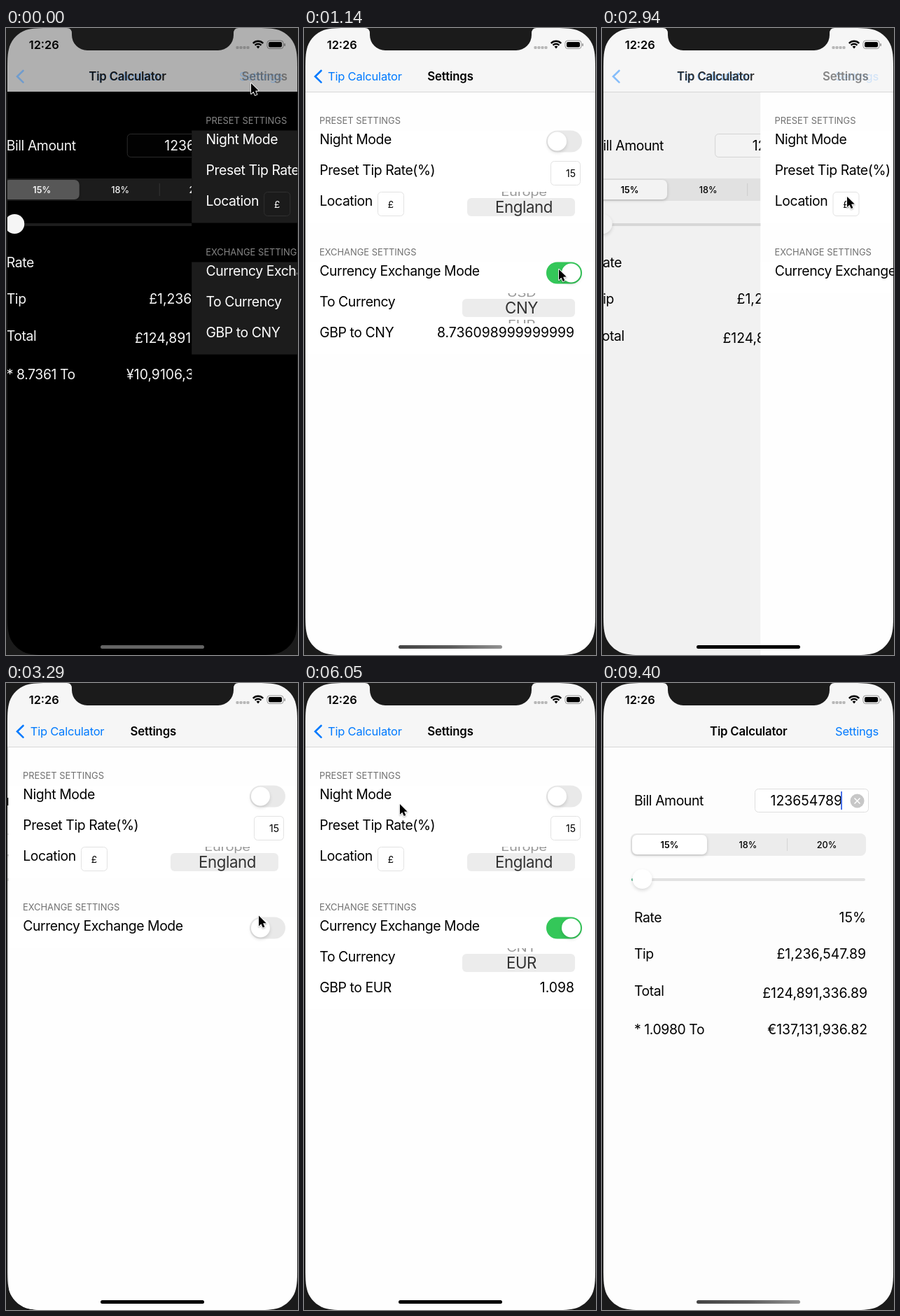
An HTML page with a canvas that plays this animation: 417 by 896 pixels, repeating every 9500 ms.

```html
<!DOCTYPE html>
<html lang="en">
<head>
<meta charset="utf-8">
<title>Tip Calculator</title>
<style>
html, body { margin: 0; width: 100%; height: 100%; overflow: hidden; background: #1b1b1b; }
canvas { display: block; }
</style>
</head>
<body>
<canvas id="stage" width="417" height="896"></canvas>
<script>
const ctx = document.getElementById('stage').getContext('2d');
const LOOP = 9500, WIDTH = 414, BLUE = '#007aff', BEZEL = '#1b1b1b';
const NIGHT_OFF = 640, EXCHANGE_OFF = 1320, EXCHANGE_ON = 4290, CURRENCY_SET = 5450;
const slides = [
  { start: -74, push: true }, { start: 2103, push: false },
  { start: 2850, push: true }, { start: 6475, push: false }
];
// Pointer path: time, x, y
const pointer = [
  [0, 350, 79], [90, 350, 80], [500, 371, 167], [640, 371, 167], [960, 364, 339],
  [1030, 364, 339], [1140, 364, 345], [1480, 364, 345], [2020, 49, 74], [2270, 49, 74],
  [2680, 345, 73], [2840, 347, 80], [2940, 350, 241], [3200, 361, 332], [3590, 361, 336],
  [3880, 360, 330], [4110, 362, 350], [4290, 362, 350], [4410, 353, 387], [4820, 330, 418],
  [5000, 330, 418], [5300, 328, 388], [5450, 328, 388], [5760, 165, 204], [5940, 165, 204],
  [6290, 47, 74], [6500, 47, 74], [6890, 107, 75], [7400, 390, 67], [7770, 390, 67], [8660, 376, 900]
];

const clamp = v => Math.max(0, Math.min(1, v));
const ramp = (t, start, length) => clamp((t - start) / length);
const smooth = v => v * v * (3 - 2 * v);
const spring = s => s <= 0 ? 0 : 1 - (1 + 17 * s) * Math.exp(-17 * s);

let light = 0;
const gray = v => `rgb(${v},${v},${v})`;
const tone = (dark, bright) => gray(Math.round(dark + (bright - dark) * light));

function text(s, x, y, { size = 19.4, color = tone(255, 0), weight = 400, align = 'left', spacing = -0.42, alpha = 1 } = {}) {
  ctx.save();
  ctx.globalAlpha *= clamp(alpha);
  ctx.font = `${weight} ${size}px Inter, sans-serif`;
  ctx.letterSpacing = spacing + 'px';
  ctx.textAlign = align;
  ctx.fillStyle = color;
  ctx.fillText(s, x, y);
  ctx.restore();
}

const figure = (s, right, y, size) => text(s, right, y, { size, align: 'right', spacing: 0 });

function box(x, y, w, h, r, fill, stroke) {
  ctx.beginPath();
  ctx.roundRect(x, y, w, h, r);
  if (fill) { ctx.fillStyle = fill; ctx.fill(); }
  if (stroke) { ctx.strokeStyle = stroke; ctx.lineWidth = 1; ctx.stroke(); }
}

function shadowed(blur, dy, alpha, draw) {
  ctx.save();
  ctx.shadowColor = `rgba(0,0,0,${alpha})`;
  ctx.shadowBlur = blur;
  ctx.shadowOffsetY = dy;
  draw();
  ctx.restore();
}

function clipped(x, y, w, h, draw) {
  ctx.save();
  ctx.beginPath();
  ctx.rect(x, y, w, h);
  ctx.clip();
  draw();
  ctx.restore();
}

function line(points, color, width) {
  ctx.beginPath();
  points.forEach(([x, y]) => ctx.lineTo(x, y));
  ctx.strokeStyle = color;
  ctx.lineWidth = width;
  ctx.stroke();
}

function knob(x, y, r) {
  shadowed(5, 2.5, 0.14, () => box(x - r, y - r, 2 * r, 2 * r, r, '#fff'));
}

function toggle(y, position, tint) {
  box(346, y, 51, 31, 15.5, tone(57, 233));
  ctx.save();
  ctx.globalAlpha *= tint;
  box(346, y, 51, 31, 15.5, light > 0.5 ? '#34c759' : '#30d158');
  ctx.restore();
  knob(361.5 + 20 * position, y + 15.5, 13.5);
}

function wheel(x, y, w, top, height, items, selected) {
  const mid = x + w / 2, center = y + 13;
  box(x, y, w, 26, 6, tone(47, 236));
  clipped(x, top, w, height, () => items.forEach((item, i) => {
    const away = i - selected, distance = Math.min(1, Math.abs(away));
    if (Math.abs(away) > 1.5) return;
    ctx.save();
    ctx.translate(mid, center + 22.5 * away);
    ctx.scale(1, 1 - 0.2 * distance);
    text(item, 4, 8.2, { size: 22.3 - 2 * distance, align: 'center', color: tone(190, 50), alpha: 1 - 0.5 * distance });
    ctx.restore();
  }));
}

function drawMain(t, exchange, focused) {
  ctx.fillStyle = tone(0, 253);
  ctx.fillRect(2, 91, WIDTH, 805);
  text('Bill Amount', 46, 175);
  box(218.5, 151.5, 162, 33, 5, tone(2, 255), tone(44, 222));
  figure('123654789', focused ? 343 : 374, 175);
  if (focused) {
    const phase = t < 7450 ? 700 : (t - 7450) % 790;
    ctx.globalAlpha = phase < 300 ? 1 - ramp(phase, 0, 60) : ramp(phase, 300, 60);
    ctx.fillStyle = '#4a72e8';
    ctx.fillRect(341, 155, 2, 26);
    ctx.globalAlpha = 1;
    box(354.5, 158.5, 20, 20, 10, tone(100, 199));
    line([[360.5, 164.5], [368.5, 172.5]], '#fff', 1.5);
    line([[368.5, 164.5], [360.5, 172.5]], '#fff', 1.5);
  }

  box(41, 215, 336, 32, 8, tone(29, 236));
  shadowed(4, 1.5, 0.2, () => box(43, 217, 107, 28, 7, tone(91, 255)));
  line([[264.5, 222], [264.5, 240]], tone(55, 213), 1);
  [['15%', 96.5, 600], ['18%', 208.5, 500], ['20%', 321, 500]].forEach(([label, x, weight]) =>
    text(label, x, 235.5, { size: 12.7, weight, align: 'center', spacing: 0 }));

  box(42, 279, 334, 4, 2, tone(30, 226));
  box(42, 279, 10, 4, 2, '#34a878');
  knob(57.5, 280, 14);

  const row = (label, value, y, right = 377, drop = 0) => {
    text(label, 46, y);
    figure(value, right, y + drop);
  };
  row('Rate', '15%', 342);
  row('Tip', '£1,236,547.89', 394);
  row('Total', '£124,891,336.89', 447, 379, 3);
  if (exchange) {
    if (t < CURRENCY_SET) row('* 8.7361 To', '¥10,9106,3083.34', 502, 379);
    else row('* 1.0980 To', '€137,131,936.82', 502, 379);
  }
}

function drawSettings(t, exchange) {
  ctx.fillStyle = tone(0, 254);
  ctx.fillRect(2, 91, WIDTH, 805);
  const header = { size: 12.9, color: tone(134, 112), spacing: 0 };
  const shown = t < EXCHANGE_ON ? 1 - ramp(t, EXCHANGE_OFF, 250) : ramp(t, EXCHANGE_ON, 100);

  text('PRESET SETTINGS', 22, 136.5, header);
  text('EXCHANGE SETTINGS', 22, 324.5, header);
  ctx.fillStyle = tone(28, 255);
  ctx.fillRect(2, 146.5, WIDTH, 132);
  ctx.fillRect(2, 334.5, WIDTH, 44 + 88 * shown);

  text('Night Mode', 22.3, 166);
  toggle(146.5, 1 - smooth(ramp(t, NIGHT_OFF, 130)), 1 - ramp(t, NIGHT_OFF, 250));
  text('Preset Tip Rate(%)', 22.3, 210);
  box(352.5, 190.5, 42, 34, 5, tone(27, 255), tone(48, 226));
  figure('15', 388, 213, 14);
  text('Location', 22.3, 254);
  box(105.5, 234.5, 37, 34, 5, tone(27, 255), tone(48, 226));
  text('£', 124, 257, { size: 13.6, align: 'center', spacing: 0 });
  wheel(233, 243, 154, 234, 44, ['Europe', 'England'], 1);

  text('Currency Exchange Mode', 22.3, 354);
  toggle(334.5,
    exchange === (t >= EXCHANGE_ON) ? smooth(ramp(t, EXCHANGE_ON, 130)) : 1 - smooth(ramp(t, EXCHANGE_OFF, 130)),
    t >= EXCHANGE_ON ? ramp(t, EXCHANGE_ON, 240) : 1 - ramp(t, EXCHANGE_OFF, 240));

  if (shown > 0) {
    ctx.save();
    ctx.globalAlpha = shown;
    text('To Currency', 22.3, 398);
    wheel(226, 387, 161, 379, 43, ['USD', 'CNY', 'EUR'], 1 + smooth(ramp(t, 5000, 450)));
    const euro = t >= CURRENCY_SET;
    text(euro ? 'GBP to EUR' : 'GBP to CNY', 22.3, 442);
    figure(euro ? '1.098' : '8.736098999999999', 386, 442);
    ctx.restore();
  }
}

function drawNavigation(p, push) {
  ctx.fillStyle = tone(176, 246);
  ctx.fillRect(2, 0, WIDTH, 91);
  ctx.fillStyle = tone(0, 214);
  ctx.fillRect(2, 91, WIDTH, 1);

  const moved = Math.pow(p, push ? 1.2 : 0.75);
  const left = 154 - 120 * moved;
  const backAlpha = push ? p : 0.3 * p;
  const bold = { size: 16.8, weight: 600, color: '#000', spacing: -0.2 };
  const link = { size: 16.5, color: BLUE, spacing: -0.2 };

  text('Tip Calculator', left, 75, { ...link, alpha: backAlpha });
  text('Tip Calculator', left, 75, { ...bold, alpha: push ? 1 - p * p : 1 - p });
  text('Settings', 333, 75, { ...link, alpha: push ? (1 - p) ** 3 : 1 - p });
  text('Settings', 209 + 228 * (1 - moved), 75, { ...bold, align: 'center', alpha: p });
  ctx.globalAlpha = backAlpha;
  ctx.lineCap = 'round';
  line([[24.5, 61], [16, 69.3], [24.5, 77.6]], BLUE, 2.6);
  ctx.lineCap = 'butt';
  ctx.globalAlpha = 1;
}

function drawStatusBar() {
  text('12:26', 32.7, 29.5, { size: 16.4, weight: 600, color: '#000', spacing: 0 });
  for (let i = 0; i < 4; i++) box(328.5 + 5 * i, 26, 4, 4, 1.2, tone(138, 184));
  ctx.fillStyle = ctx.strokeStyle = '#000';
  ctx.lineWidth = 2.4;
  [6.3, 10.2].forEach(r => {
    ctx.beginPath();
    ctx.arc(360, 29, r, -Math.PI * 0.75, -Math.PI * 0.25);
    ctx.stroke();
  });
  ctx.beginPath();
  ctx.moveTo(360, 29.5);
  ctx.arc(360, 29, 3.4, -Math.PI * 0.75, -Math.PI * 0.25);
  ctx.fill();
  box(373, 18, 23, 11.5, 3.5, null, 'rgba(0,0,0,.4)');
  box(375, 20, 19, 7.5, 2, '#000');
  box(397.3, 22, 1.5, 4, 1, 'rgba(0,0,0,.45)');
}

function drawHomeBar(t) {
  let fill = tone(100, 0);
  if (t > 6500 || (t > NIGHT_OFF && t < 2400)) {
    fill = ctx.createLinearGradient(135, 0, 283, 0);
    fill.addColorStop(0, '#444');
    fill.addColorStop(0.5, '#5c5c5c');
    fill.addColorStop(1, '#929292');
  }
  box(135, 882, 148, 5, 2.5, fill);
}

// Smooth-cornered display outline, one quarter per rotation of the corner curve
function screenPath() {
  const r = 41.5, w = WIDTH / 2, h = 448;
  ctx.beginPath();
  [[-1, -1], [1, -1], [1, 1], [-1, 1]].forEach(([sx, sy]) => {
    const curve = [[0, 1.529], [0, 1.088], [0, 0.868], [0.075, 0.631], [0.169, 0.373],
      [0.373, 0.169], [0.631, 0.075], [0.868, 0], [1.088, 0], [1.529, 0]]
      .map(([x, y]) => [2 + w + sx * (w - r * x), h + sy * (h - r * y)]);
    if (sx !== sy) curve.reverse();
    ctx.lineTo(...curve[0]);
    for (let i = 1; i < 10; i += 3) ctx.bezierCurveTo(...curve[i], ...curve[i + 1], ...curve[i + 2]);
  });
  ctx.closePath();
}

function drawNotch() {
  ctx.beginPath();
  ctx.moveTo(87, 0);
  ctx.quadraticCurveTo(94, 0, 94, 8);
  ctx.arcTo(94, 32, 118, 32, 22);
  ctx.arcTo(325, 32, 325, 8, 22);
  ctx.lineTo(325, 8);
  ctx.quadraticCurveTo(325, 0, 332, 0);
  ctx.fillStyle = BEZEL;
  ctx.fill();
}

function drawPointer(t) {
  const i = pointer.findIndex(key => key[0] > t);
  if (i < 0) return;
  const [t0, x0, y0] = pointer[i - 1], [t1, x1, y1] = pointer[i];
  const k = smooth((t - t0) / (t1 - t0));
  ctx.save();
  ctx.translate(x0 + (x1 - x0) * k, y0 + (y1 - y0) * k);
  ctx.beginPath();
  [[0, 0], [0, 15], [3.4, 11.8], [5.8, 17], [8.4, 15.9], [6.1, 10.8], [10.7, 10.6]].forEach(([x, y]) => ctx.lineTo(x, y));
  ctx.closePath();
  ctx.lineJoin = 'round';
  ctx.strokeStyle = '#fff';
  ctx.lineWidth = 1.8;
  shadowed(2, 1, 0.3, () => ctx.stroke());
  ctx.fillStyle = '#000';
  ctx.fill();
  ctx.restore();
}

function render(t) {
  const slide = slides.filter(s => s.start <= t).pop();
  const moved = spring((t - slide.start) / 1000);
  const p = slide.push ? moved : 1 - moved;
  const exchange = t < EXCHANGE_OFF || t >= EXCHANGE_ON;
  light = ramp(t, NIGHT_OFF, 160);

  ctx.fillStyle = BEZEL;
  ctx.fillRect(0, 0, 417, 896);
  ctx.save();
  screenPath();
  ctx.clip();

  const edge = WIDTH * (1 - p);
  if (p < 0.999) {
    ctx.save();
    ctx.translate(-0.3 * WIDTH * p, 0);
    drawMain(t, exchange, !slide.push);
    ctx.restore();
    ctx.fillStyle = `rgba(0,0,0,${0.105 * p})`;
    ctx.fillRect(2, 91, edge, 805);
  }
  if (p > 0.001) {
    if (!slide.push) {
      ctx.fillStyle = `rgba(0,0,0,${0.025 * p})`;
      ctx.fillRect(edge - 7, 91, 9, 805);
    }
    ctx.save();
    ctx.translate(edge, 0);
    drawSettings(t, exchange);
    ctx.restore();
  }
  drawNavigation(p, slide.push);
  drawStatusBar();
  drawHomeBar(t);
  ctx.restore();
  drawNotch();
  drawPointer(t);
}

const begin = performance.now();
function tick() {
  render((performance.now() - begin) % LOOP);
  requestAnimationFrame(tick);
}
tick();
</script>
</body>
</html>
```
